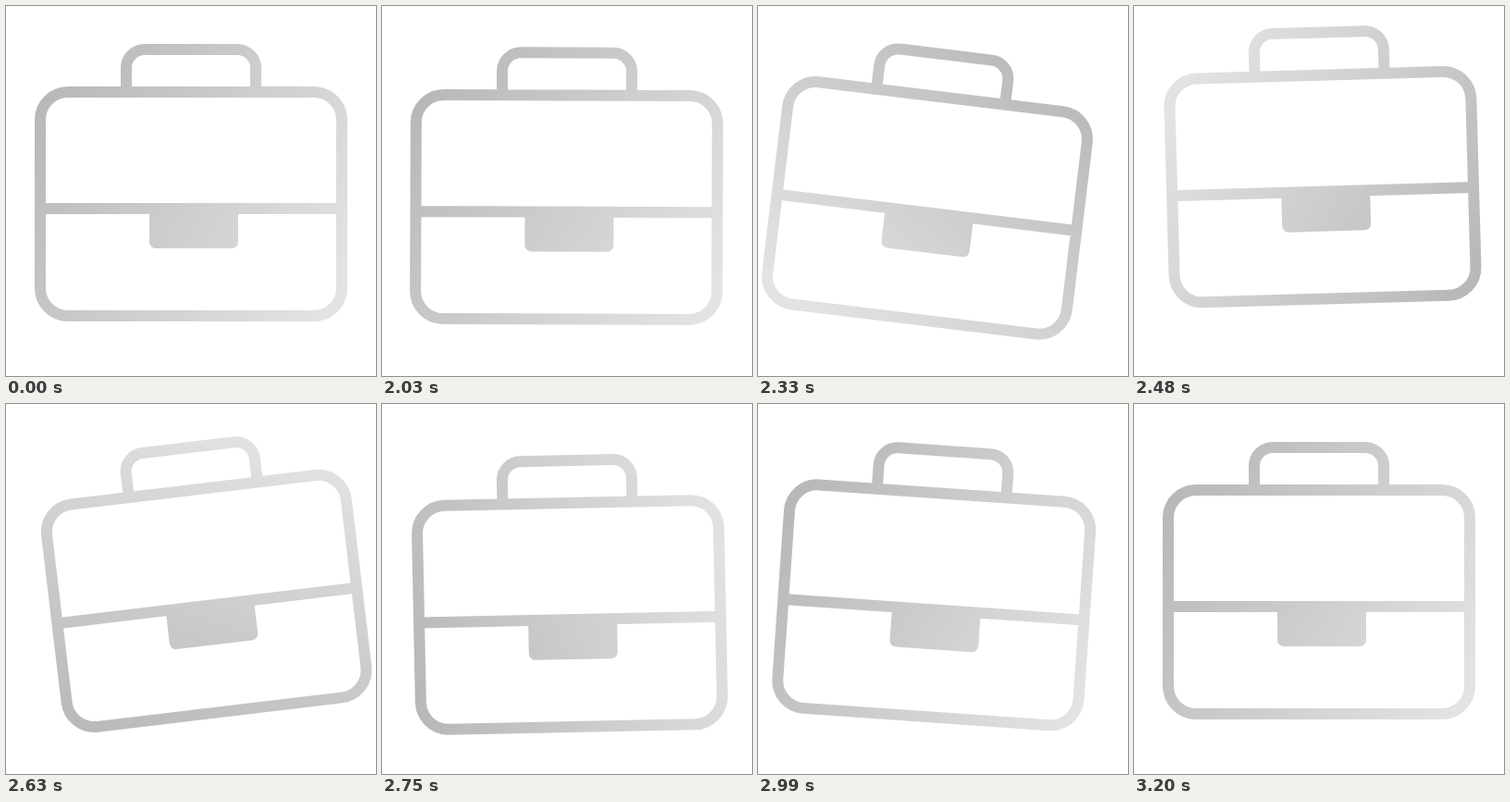
These frames come from a looping animation (400 px wide and 400 px high, 3230 ms). An HTML page with a canvas:

```html
<!DOCTYPE html>
<html lang="en">
<head>
<meta charset="utf-8">
<title>Swinging briefcase</title>
<style>
  html, body { margin: 0; width: 100%; height: 100%; overflow: hidden; background: #fff; }
  canvas { display: block; width: 400px; height: 400px; }
</style>
</head>
<body>
<canvas id="stage" width="400" height="400"></canvas>
<script>
const ctx = document.getElementById('stage').getContext('2d');
const LOOP = 3230, REST = 2000, STEP = 30;
const PIVOT = { x: 200, y: 73 };

// Keys are [step, value], joined by sine easing.
const TILT = [[0, 0], [9, 7.1], [10.3, 7.1], [20.2, -7], [30, 5], [40, 0]];
const DROP = [[0, 0], [5, 37.2], [6, 37.2], [15.2, -18.8], [26, 14.8], [36.5, 0]];
const SHADE = [[-1, 30], [33, 390]];

const radians = degrees => degrees * Math.PI / 180;

function valueAt(keys, step) {
  const next = keys.findIndex(key => key[0] > step);
  if (next < 0) return keys[keys.length - 1][1];
  if (next === 0) return keys[0][1];
  const [from, a] = keys[next - 1], [to, b] = keys[next];
  const eased = (1 - Math.cos(Math.PI * (step - from) / (to - from))) / 2;
  return a + (b - a) * eased;
}

function shading(angle) {
  const dx = 190 * Math.cos(angle), dy = 190 * Math.sin(angle);
  const gradient = ctx.createLinearGradient(200 - dx, 205 - dy, 200 + dx, 205 + dy);
  gradient.addColorStop(0, '#b7b8b7');
  gradient.addColorStop(1, '#e3e3e3');
  return gradient;
}

// Paths are built in the tilted frame but painted in stage space,
// so the gradient turns independently of the case.
function paint(step) {
  const outline = new Path2D();
  outline.roundRect(37, 93, 326, 242, 30);
  outline.moveTo(37, 219);
  outline.lineTo(363, 219);
  outline.moveTo(130, 93);
  outline.lineTo(130, 67);
  outline.arcTo(130, 47, 150, 47, 20);
  outline.lineTo(250, 47);
  outline.arcTo(270, 47, 270, 67, 20);
  outline.lineTo(270, 93);

  const clasp = new Path2D();
  clasp.roundRect(155, 219, 96, 43, [0, 0, 7, 7]);

  const pose = new DOMMatrix()
    .translate(PIVOT.x, PIVOT.y + valueAt(DROP, step))
    .rotate(valueAt(TILT, step))
    .translate(-PIVOT.x, -PIVOT.y);
  const placedOutline = new Path2D(), placedClasp = new Path2D();
  placedOutline.addPath(outline, pose);
  placedClasp.addPath(clasp, pose);

  ctx.fillStyle = '#fff';
  ctx.fillRect(0, 0, 400, 400);
  ctx.fillStyle = ctx.strokeStyle = shading(radians(valueAt(SHADE, step)));
  ctx.lineWidth = 12;
  ctx.stroke(placedOutline);
  ctx.fill(placedClasp);
}

let start = null;
function tick(now) {
  if (start === null) start = now;
  const time = (now - start) % LOOP;
  paint(Math.max(0, Math.floor((time - REST) / STEP)));
  requestAnimationFrame(tick);
}
paint(0);
requestAnimationFrame(tick);
</script>
</body>
</html>
```
